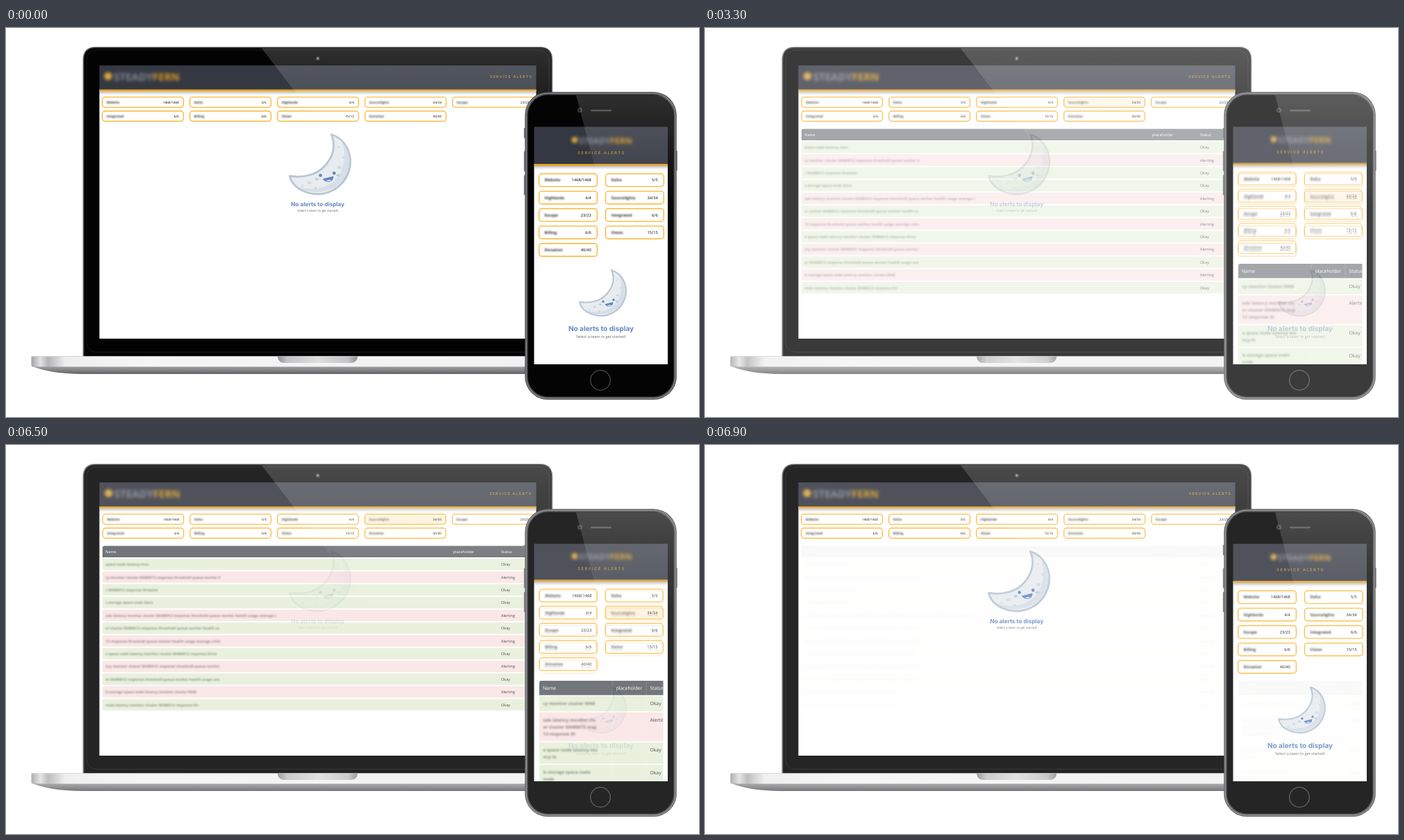
Write an HTML page that moves like this. It is 998 px wide and 561 px high and loops after 7000 ms.

```html
<!DOCTYPE html>
<html lang="en">
<head>
<meta charset="utf-8">
<title>Service alerts</title>
<style>
html, body { margin: 0; width: 100%; height: 100%; overflow: hidden; background: #fff; }
svg { display: block; width: 100vw; height: 100vh; }
text { font-family: "Open Sans", sans-serif; text-rendering: geometricPrecision; white-space: pre; }
.head { font-family: Inter, sans-serif; }
</style>
</head>
<body>
<svg viewBox="0 0 998 561" xmlns="http://www.w3.org/2000/svg">
<defs>
  <clipPath id="lapScreen"><rect x="134.5" y="54" width="629" height="394"/></clipPath>
  <clipPath id="telScreen"><rect x="760.5" y="142.5" width="192.5" height="342.5"/></clipPath>
  <clipPath id="telTable"><path d="M768 485V343q0-3 3-3h175.5v145z"/></clipPath>
  <filter id="soft" x="-20%" y="-80%" width="140%" height="260%"><feGaussianBlur stdDeviation="1.3"/></filter>
  <filter id="softer" x="-20%" y="-60%" width="140%" height="220%"><feGaussianBlur stdDeviation="2.1"/></filter>
  <linearGradient id="shade" x2="0" y2="1">
    <stop stop-color="#000" stop-opacity=".26"/><stop offset="1" stop-color="#000" stop-opacity="0"/>
  </linearGradient>
  <linearGradient id="glare" x2="0" y2="1">
    <stop stop-color="#fff" stop-opacity=".17"/><stop offset=".5" stop-color="#fff" stop-opacity=".08"/>
    <stop offset="1" stop-color="#fff" stop-opacity="0"/>
  </linearGradient>
  <linearGradient id="deck">
    <stop stop-color="#a2a2a4"/><stop offset=".016" stop-color="#e2e2e3"/><stop offset=".03" stop-color="#b4b4b6"/>
    <stop offset=".06" stop-color="#eeeeef"/><stop offset=".2" stop-color="#f5f5f6"/><stop offset="1" stop-color="#f1f1f2"/>
  </linearGradient>
  <linearGradient id="under" x2="0" y2="1">
    <stop stop-color="#a2a2a4"/><stop offset=".5" stop-color="#858588"/><stop offset="1" stop-color="#626265"/>
  </linearGradient>
  <linearGradient id="notch">
    <stop stop-color="#8e8e90"/><stop offset=".12" stop-color="#c4c4c6"/><stop offset=".5" stop-color="#dededf"/>
    <stop offset=".88" stop-color="#c4c4c6"/><stop offset="1" stop-color="#8e8e90"/>
  </linearGradient>
  <g id="moon">
    <path id="crescent" d="M468.500 153.500C488 159 501 182 494 206C485 233 459 244 436 238C421 234 411 225 408.500 213.500C430 216.500 449 211 460 198C472 184 475 168 468.500 153.500Z" fill="#e8ecef"/>
    <path d="M484 163C498 183 498 210 480 225C461 240 434 240 417 228C440 236 463 232 476 217C488 203 490 184 484 163Z" fill="#d6dee7"/>
    <g fill="#d0d9e3">
      <ellipse cx="480" cy="201" rx="3" ry="2.500"/><circle cx="486" cy="187" r="1.800"/><circle cx="479" cy="172" r="1.400"/>
      <ellipse cx="437" cy="223" rx="3" ry="2"/><circle cx="427" cy="228" r="1.600"/><circle cx="446" cy="231" r="2"/>
    </g>
    <use href="#crescent" fill-opacity="0" stroke="#b8c5d3" stroke-width="2.800" stroke-linejoin="round"/>
    <g fill="#b9cae4"><ellipse cx="447.500" cy="218" rx="2.800" ry="1.800"/><ellipse cx="478.500" cy="212.500" rx="2.800" ry="1.800"/></g>
    <g fill="#5f86c4"><circle cx="452.800" cy="212.600" r="2.300"/><circle cx="472.500" cy="209.400" r="2.300"/>
      <path d="M456 217.600L471.500 213.800Q472 220.500 466 221.800Q459.500 223 456 217.600Z"/></g>
    <path d="M460.500 220.500Q465 217.500 469 219.500Q465 222.600 460.500 220.500Z" fill="#c5d5ee"/>
  </g>
</defs>
<g id="table"></g>
<g id="empty"></g>
</svg>
<script>
const teams = [
  ['Website', '1468/1468'], ['Delta', '5/5'], ['Highlands', '4/4'], ['Sourcelights', '34/34'], ['Escape', '23/23'],
  ['Integrated', '6/6'], ['Billing', '6/6'], ['Vision', '15/15'], ['Dictation', '40/40']
];
const amber = '#fbb533', gold = '#e5a32b', slate = '#343842', dark = '#343a40';
const green = '#e1edd1', red = '#f8dede';
const filler = 'web-tools storage space node latency monitor cluster 00480012 response threshold queue worker health usage average critical disk ';

const rect = (x, y, w, h, fill, more = '') =>
  `<rect x="${x}" y="${y}" width="${w}" height="${h}" fill="${fill}" ${more}/>`;
const text = (x, y, size, str, fill = '#000', more = '') =>
  `<text x="${x}" y="${y}" font-size="${size}" fill="${fill}" ${more}>${str}</text>`;
const path = (d, fill, more = '') => `<path d="${d}" fill="${fill}" ${more}/>`;
const clip = (id, body) => `<g clip-path="url(#${id})">${body}</g>`;
const smudge = (x, y, size, str, fill) => text(x, y, size, str, fill, 'font-weight="700" filter="url(#soft)"');

// Cuts a stretch of filler about as long as the given width.
function words(seed, width, size) {
  const at = seed * 17 % 60;
  return (filler + filler).substr(at, Math.round(width / size / .575)).trim();
}

function logo(x, y, size) {
  return `<g filter="url(#softer)" font-weight="700"><circle cx="${x}" cy="${y - size * .42}" r="${size * .38}" fill="#d9a441"/>` +
    text(x + size * .55, y, size, 'STEADY<tspan fill="#d99a24">FERN</tspan>', '#858890') + '</g>';
}

function banner(x, y, w, h) {
  return rect(x, y, w, h, slate) + rect(x, y + h + 3, w, 5, 'url(#shade)') + rect(x, y + h, w, 3, gold);
}

function pill(x, y, w, h, size, pad, end, [name, count], on) {
  const base = y + h / 2 + size * .36;
  return rect(x, y, w, h, on ? '#fdefd2' : '#fff', `rx="4" stroke="${amber}" stroke-width="1.4"`) +
    smudge(x + pad, base, size, name, on ? '#6c5c3e' : '#333') +
    text(x + end, base, size, count, '#000', 'text-anchor="end"');
}

function notice(x, y, size) {
  return text(x, y, size, 'No alerts to display', '#6488c3', 'class="head" font-weight="700" text-anchor="middle"') +
    text(x, y + size, size * .55, 'Select a team to get started!', '#666', 'text-anchor="middle"');
}

function laptopBody() {
  const lid = (i, fill) => path(
    `M${110.5 + i} 473.500V46Q${110.5 + i} ${27 + i} 129 ${27 + i}H769Q${787.3 - i} ${27 + i} ${787.3 - i} 46V473.500Z`, fill);
  return lid(0, '#8c8d90') + lid(1.1, '#2c2d31') + lid(2.2, '#030303') +
    rect(116, 32, 666, 435.5, 'none', 'rx="14" stroke="#17191d" stroke-width="1"') +
    '<circle cx="449" cy="44" r="3.2" fill="#25272d"/><circle cx="449" cy="44" r="1.4" fill="#8b93a8"/>' +
    path('M37 487.500H850V499H110Q62 498.500 37 487.500Z', 'url(#under)') +
    path('M36.500 474H850V488.500H39Q36.500 488.500 36.500 486Z', 'url(#deck)') +
    rect(37, 473.2, 813, .8, '#c9c9cb') +
    path('M391 473.500H506.500Q505.500 483 496 483H401.500Q392 483 391 473.500Z', 'url(#notch)');
}

function laptopTable() {
  const ends = [212, 324, 226, 222, 416, 326, 327, 321, 326, 321, 292, 292];
  const alerting = [1, 4, 6, 8, 10];
  let out = path('M139 162V148.500Q139 145.500 142 145.500H764V162Z', dark) +
    text(143.3, 156, 5.5, 'Name', '#fff') + text(644, 156, 5.5, 'placeholder', '#fff') + text(713, 156, 5.5, 'Status', '#fff');
  ends.forEach((end, i) => {
    const y = 163.8 + i * 18.4, bad = alerting.includes(i);
    out += rect(139, y, 625, 16.6, bad ? red : green) +
      smudge(143.3, y + 10.3, 5.2, words(i + 1, end - 143, 5.2), bad ? '#6d5558' : '#56634c') +
      text(713, y + 10.3, 5.5, bad ? 'Alerting' : 'Okay');
  });
  return out;
}

function laptop(full) {
  const x0 = full ? 139.4 : 138.7, step = full ? 125.8 : 126.1, w = full ? 116.4 : 116.8;
  const pills = teams.map((t, i) =>
    pill(x0 + i % 5 * step, i < 5 ? 99.6 : 119.7, w, 14.8, 4.7, 6, 110.2, t, full && i === 3)).join('');
  const screen = rect(134, 89, 630, 360, '#fff') + banner(134, 53, 630, 35.5) + logo(full ? 148 : 147, 75.8, 15) +
    text(full ? 696 : 697, 72, 5.2, 'SERVICE ALERTS', gold, 'class="head" letter-spacing="1.32"') + pills +
    (full ? laptopTable() : '<use href="#moon"/>' + notice(449, 257, 8.2));
  return laptopBody() + clip('lapScreen', screen) +
    path('M368 29H769Q785 29 785 46V240H530Z', 'url(#glare)');
}

function phoneBody() {
  const key = (x, y, h) => rect(x, y, 2.2, h, '#77787b', 'rx="1"');
  return key(745.8, 144, 15) + key(745.8, 177.5, 29) + key(745.8, 212, 29) + key(964.6, 177, 29) +
    rect(747.3, 92.3, 218.4, 443.7, '#4c4d50', 'rx="33"') +
    rect(749.2, 94.2, 214.6, 439.9, 'none', 'rx="31" stroke="#909194" stroke-width="1.1"') +
    rect(751.5, 96.5, 210, 435.3, '#040404', 'rx="29"') +
    '<circle cx="826.500" cy="118.500" r="3.600" fill="#34363b"/><circle cx="826.500" cy="118.500" r="1.600" fill="#14171f"/>' +
    rect(842, 117.8, 30, 2.4, '#3c3d40', 'rx="1.2"') +
    '<circle cx="856" cy="508" r="14.300" fill="none" stroke="#4b4c4f" stroke-width="1.300"/>';
}

function phoneTable() {
  const rows = [[362, 22, 86], [385.6, 41.5, 85, 90, 50], [428.7, 31, 83, 19], [461.2, 31, 79, 17]];
  let out = rect(768, 340, 179, 20.7, dark) + text(773, 352.8, 6.8, 'Name', '#fff') +
    text(878.7, 352.8, 6.8, 'placeholder', '#fff') + text(927.5, 352.8, 6.8, 'Status', '#fff');
  rows.forEach(([y, h, ...lines], i) => {
    const bad = i === 1;
    out += rect(768, y, 179, h, bad ? red : green) + text(927.5, y + 13.3, 6.8, bad ? 'Alerting' : 'Okay');
    lines.forEach((w, k) => {
      out += smudge(773.5, y + 13.2 + k * 10, 6.4, words(i * 3 + k + 2, w, 6.4), bad ? '#664c50' : '#505e46');
    });
  });
  return clip('telTable', out + path('M873 340V485M922 340V485', 'none', 'stroke="#fff" stroke-opacity=".22" stroke-width=".7"'));
}

function phone(full) {
  const y0 = full ? 207.8 : 210.2, step = full ? 24.75 : 25.15, w = full ? 82.8 : 83.8;
  const pills = teams.map((t, i) =>
    pill((full ? 768.2 : 767.6) + i % 2 * (full ? 95 : 95.9), y0 + (i >> 1) * step, w, 18.4, 5.7, 8, 75.2, t, full && i === 3)).join('');
  const screen = rect(760, 197, 194, 289, '#fff') + banner(760, 142, 194, full ? 52 : 54) + logo(819, full ? 165 : 166.5, 12) +
    text(823.3, full ? 180.3 : 182.2, 5.6, 'SERVICE ALERTS', gold, 'class="head" letter-spacing="1.62"') + pills +
    (full ? phoneTable() : '<use href="#moon" transform="translate(514 232) scale(.764)"/>' + notice(857, 437, 10.05));
  return phoneBody() + clip('telScreen', screen) +
    path('M821 97H934Q961 97 961 124V270H866Z', 'url(#glare)');
}

const layers = ['empty', 'table'].map(id => document.getElementById(id));
layers.forEach((g, full) => { g.innerHTML = laptop(full) + phone(full); });

// Share of the table view, in sixths, changed every 100 ms.
function mix(t) {
  if (t < 3000) return 0;
  if (t < 3500) return (Math.floor((t - 3000) / 100) + 1) / 6;
  if (t < 6500) return 1;
  return (5 - Math.floor((t - 6500) / 100)) / 6;
}

function draw(now) {
  const p = mix(now % 7000);
  layers[0].setAttribute('opacity', 1 - p);
  layers[1].setAttribute('opacity', p);
}

const start = performance.now();
function tick() {
  draw(performance.now() - start);
  requestAnimationFrame(tick);
}
tick();
</script>
</body>
</html>
```
